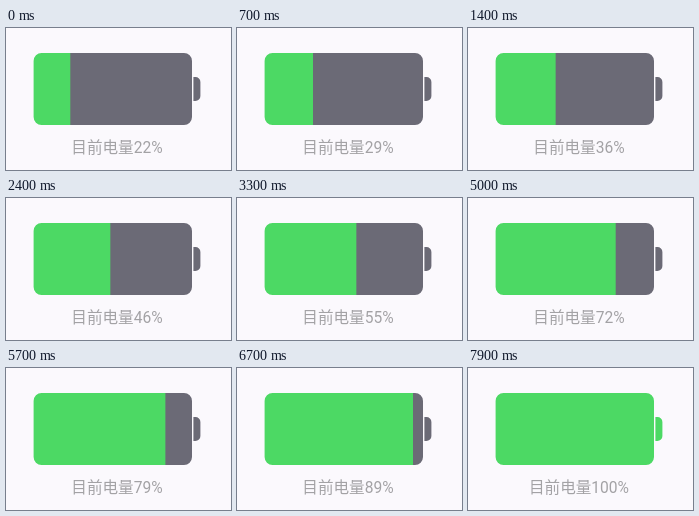
Write an HTML page with a canvas that moves like this. It is 225 by 142 pixels and loops after 9100 ms.

```html
<!DOCTYPE html>
<html lang="zh-CN">
<head>
<meta charset="utf-8">
<title>电量</title>
<style>
  html, body { margin: 0; width: 100%; height: 100%; overflow: hidden; background: #fbf9fd; }
  canvas { display: block; width: 225px; height: 142px; }
</style>
</head>
<body>
<canvas id="stage"></canvas>
<script>
const W = 225, H = 142;
const LOOP = 9100, STEP = 100, START = 22;
const LEFT = 27.6, RIGHT = 194.4;
const PAPER = '#fbf9fd', GREEN = '#4cd964', GREY = '#6b6a76', INK = '#a3a2a5';

const canvas = document.getElementById('stage');
const ctx = canvas.getContext('2d');
const scale = window.devicePixelRatio || 1;
canvas.width = W * scale;
canvas.height = H * scale;

const shell = new Path2D();
shell.roundRect(LEFT, 25, 158.4, 72, 8);
shell.roundRect(187.4, 49, RIGHT - 187.4, 24, [0, 5, 5, 0]);

// Fills the part of the battery between two x positions.
function fillShell(color, from, to) {
  ctx.save();
  ctx.beginPath();
  ctx.rect(from, 0, to - from, H);
  ctx.clip();
  ctx.fillStyle = color;
  ctx.fill(shell);
  ctx.restore();
}

function draw(percent) {
  ctx.setTransform(scale, 0, 0, scale, 0, 0);
  ctx.fillStyle = PAPER;
  ctx.fillRect(0, 0, W, H);

  // The charge level runs across the body and the tip together.
  const edge = percent < 100 ? LEFT + (RIGHT - LEFT) * percent / 100 : W;
  fillShell(GREY, Math.floor(edge), W);
  fillShell(GREEN, 0, edge);

  ctx.font = '15.6px Roboto, "Noto Sans CJK SC", "Noto Sans CJK", sans-serif';
  ctx.textAlign = 'center';
  ctx.textBaseline = 'alphabetic';
  ctx.fillStyle = INK;
  ctx.fillText('目前电量' + percent + '%', 111, 125);
}

const origin = performance.now();

function tick() {
  const time = (performance.now() - origin) % LOOP;
  draw(Math.min(100, START + Math.floor(time / STEP)));
  requestAnimationFrame(tick);
}
tick();
</script>
</body>
</html>
```
